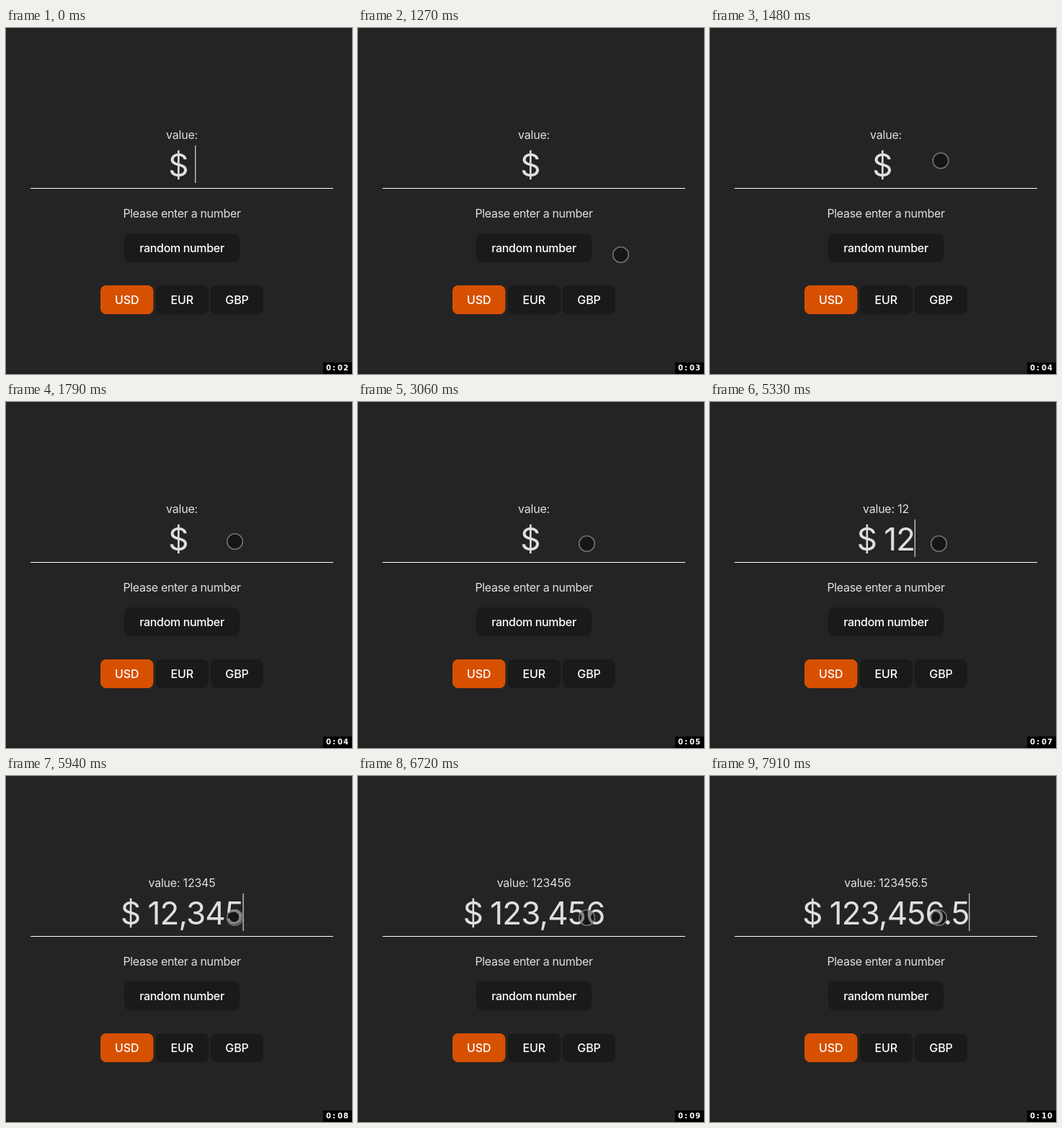
An HTML page that plays this animation: 480 px wide and 480 px high, repeating every 8000 ms.

```html
<!DOCTYPE html>
<html lang="en">
<head>
<meta charset="utf-8">
<title>Currency input</title>
<style>
  html, body { margin: 0; width: 100%; height: 100%; overflow: hidden; background: #242424; }
  svg { display: block; width: 100vw; height: 100vh; }
  text { font: 16px Inter, sans-serif; letter-spacing: -.33px; fill: #dfdfdf; text-anchor: middle; white-space: pre; }
  .button text { font-weight: 500; fill: #fff; }
  .button rect { fill: #1a1a1a; }
  .button.active rect { fill: #d75000; }
  .currency text { letter-spacing: -.1px; }
  #label { letter-spacing: -.22px; }
  #amount { font-size: 44px; letter-spacing: -.9px; word-spacing: -1.2px; text-anchor: start; }
  #clock { font: bold 10px "DejaVu Sans", sans-serif; letter-spacing: 0; fill: #fff; text-anchor: start; }
</style>
</head>
<body>
<svg viewBox="0 0 480 480">
  <rect y="476.5" width="480" height="3.5" fill="#221d20"/>
  <text id="label" x="244" y="154"></text>
  <text id="amount" y="206"></text>
  <rect id="caret" y="163" width="1" height="52" fill="#fff"/>
  <rect x="34" y="222" width="420" height="1" fill="#fff"/>
  <text x="244" y="263">Please enter a number</text>
  <g class="button"><rect x="164" y="285" width="160" height="40" rx="8"/><text x="244" y="311">random number</text></g>
  <g class="button currency active"><rect x="131" y="357" width="73.5" height="40" rx="8"/><text x="167.7" y="383">USD</text></g>
  <g class="button currency"><rect x="208" y="357" width="73" height="40" rx="8"/><text x="244.3" y="383">EUR</text></g>
  <g class="button currency"><rect x="284" y="357" width="73" height="40" rx="8"/><text x="320.5" y="383">GBP</text></g>
  <circle id="pointer" r="10.8" fill="rgba(0,0,0,.4)" stroke="rgba(128,128,128,.85)" stroke-width="1.6"/>
  <rect x="440" y="464" width="40" height="16" fill="#000"/>
  <text id="clock" x="444 453 460 468" y="475.3"></text>
</svg>
<script>
const LOOP = 8000;
const CENTER = 244;
const [label, amount, caret, pointer, clock] =
  ['label', 'amount', 'caret', 'pointer', 'clock'].map(id => document.getElementById(id));

// [time, typed text]
const typing = [[0, ''], [4040, '1'], [4310, '12'], [5500, '123'], [5740, '1234'],
  [5940, '12345'], [6210, '123456'], [6780, '123456.'], [7910, '123456.5']];
const caretToggles = [20, 2550, 3060, 3530, 4820, 5330, 6720, 6780, 7290, 7760];
const clockTicks = [440, 1420, 2400, 3390, 4400, 5380, 6360, 7370];
// [time, x, y]
const pointerPath = [[1210, 418, 470], [1240, 391, 388], [1270, 364.5, 314.5], [1330, 342, 245],
  [1400, 327, 200], [1480, 320, 184], [1690, 318, 187], [1780, 317.5, 193.5], [1840, 317.5, 196.5]];

const countPassed = (times, t) => times.filter(time => time <= t).length;

function pointerAt(t) {
  const step = Math.min(1840, 1210 + Math.floor((t - 1210) / 30) * 30);
  const i = Math.max(1, pointerPath.findIndex(([time]) => time >= step));
  const [t0, x0, y0] = pointerPath[i - 1];
  const [t1, x1, y1] = pointerPath[i];
  const k = (step - t0) / (t1 - t0);
  return [x0 + (x1 - x0) * k, y0 + (y1 - y0) * k];
}

function render(t) {
  const typed = typing.filter(([time]) => time <= t).pop()[1];
  const grouped = typed.replace(/^\d+/, n => n.replace(/\B(?=(\d{3})+$)/g, ','));
  label.textContent = ('value: ' + typed.replace(/\.$/, '')).trim();
  amount.textContent = '$ ' + grouped;

  const width = amount.getComputedTextLength();
  amount.setAttribute('x', CENTER - width / 2);
  caret.setAttribute('x', CENTER + width / 2 - 0.5);
  caret.style.display = countPassed(caretToggles, t) % 2 ? 'none' : '';

  pointer.style.display = t < 1210 ? 'none' : '';
  const [x, y] = pointerAt(Math.max(t, 1210));
  pointer.setAttribute('cx', x);
  pointer.setAttribute('cy', y);

  const seconds = 2 + countPassed(clockTicks, t);
  clock.textContent = '0:' + String(seconds).padStart(2, '0');
}

function frame() {
  render(performance.now() % LOOP);
  requestAnimationFrame(frame);
}
frame();
</script>
</body>
</html>
```
